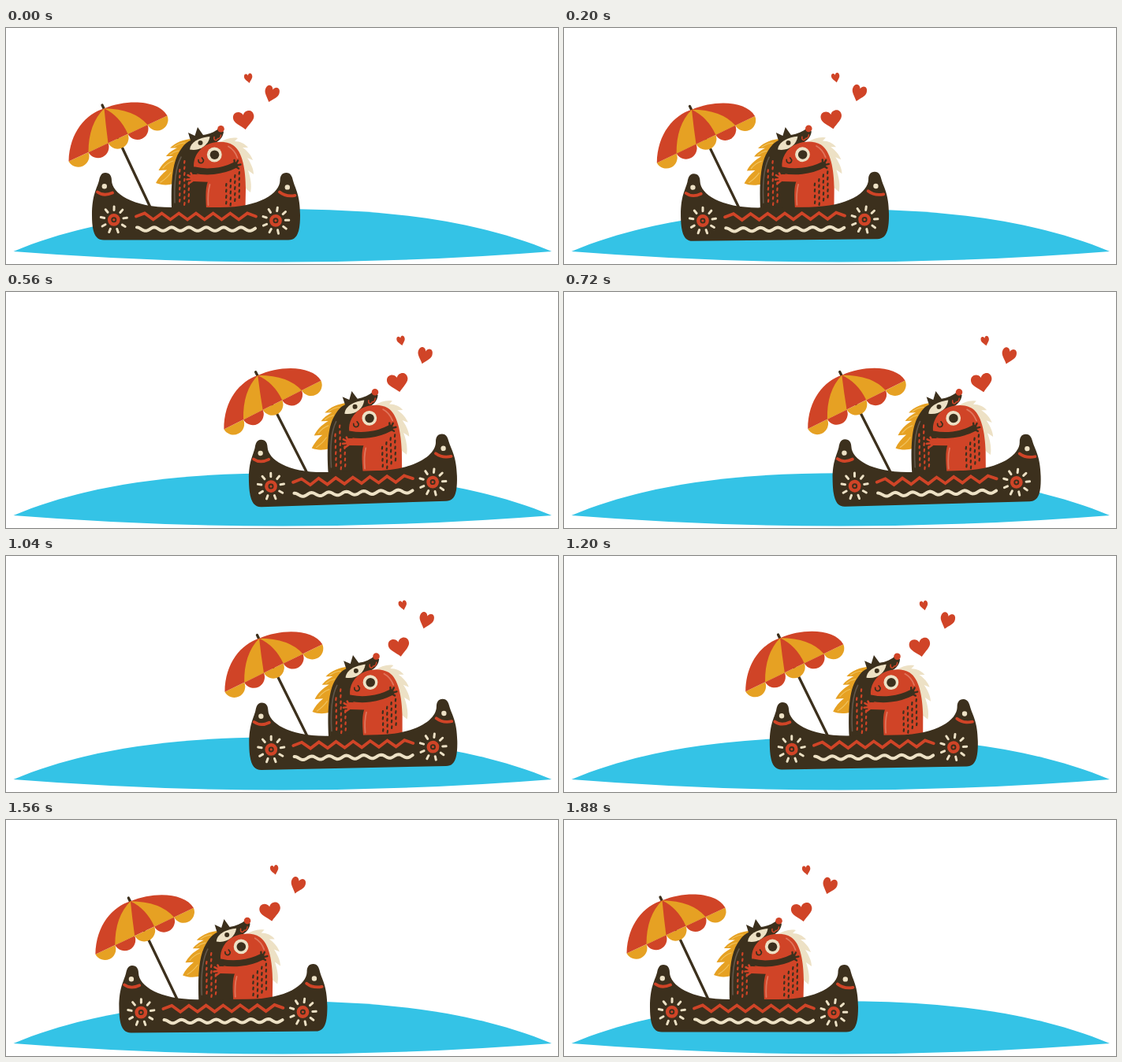
An HTML page that plays this animation: 700x300 px, repeating every 1.92 s.

```html
<!DOCTYPE html>
<html lang="en">
<head>
<meta charset="utf-8">
<title>Canoe for two</title>
<style>
  html, body { margin: 0; width: 100%; height: 100%; overflow: hidden; background: #fff; }
  svg { display: block; width: 700px; height: 300px; }
  .dark { fill: #3c301d; }
  .red { fill: #d04427; }
  .gold { fill: #e6a123; }
  .cream { fill: #ede1c5; }
  .line { fill: none; stroke-linecap: round; }
  .sDark { stroke: #3c301d; }
  .sRed { stroke: #d04427; }
  .sCream { stroke: #ede1c5; }
</style>
</head>
<body>
<svg viewBox="0 0 700 300">
  <path fill="#34c3e6" d="M9.5 284C110 241.5 230 230.3 350 230.3S591 241.5 692 284Q350 311 9.5 284Z"/>
  <g id="boat">
    <g id="hearts" class="red"></g>

    <path class="line sDark" stroke-width="3.3" d="M122 98L183.5 229"/>
    <g id="umbrella"></g>

    <!-- wolf -->
    <path class="gold" d="M236 141C226 141 214 146 208 152.5L217 152.5C210 156 206 159 203 163L212 163C203 168 197 174 193.5 181L204 180.5C198 185 193 191 190 197C197 200 206 200 212 198L226 158Z"/>
    <path class="line" stroke="#f0c25c" stroke-width="1.2" d="M213 151Q220 146 227 146M208 161Q213 157 219 156M199 178Q205 171 212 169M196 196Q204 191 209 184"/>
    <path class="dark" d="M210 230C209 196 211 171 220 157C225 149 229 145 234 143L231 133L239.5 137L243 126L250 136C258 135 265 132 271 127L276 132C275 140 270 144 262 148L256 230Z"/>
    <path class="line" stroke="#62574a" stroke-width="1.6" d="M214 222C213 197 215 177 222 164"/>
    <path class="cream" d="M233 154.5C234 144 247 139 258.5 138C257 149 246 157 233 154.5Z"/>
    <circle class="dark" cx="246.5" cy="146" r="3"/>
    <circle class="red" cx="272.5" cy="128.2" r="4.3"/>
    <path class="line sRed" stroke-width="1.5" d="M264 138.5C263 143 267 144 268.5 140.5M268.5 140.5C271 141 272.5 138.5 272.5 136"/>
    <path id="wolfSpots" class="line sRed" stroke-width="2.2"/>

    <!-- friend -->
    <path class="cream" d="M270 146C278 141 286 138.5 294 140L290 144C297 144 303 147 307 152L300 152C306 156 311 162 313 168L306 165C310 171 314 179 314 186L307 181C310 190 312 200 310 209L303 203L290 170Z"/>
    <path class="red" d="M254 230C253 212 253 203 256 195L240 184C236 175 238 162 248 153C258 144 277 142 288 149C300 157 304 180 304 205L303.5 230Z"/>
    <path class="line" stroke="#e0765c" stroke-width="1.8" d="M282 150.5Q290 155 293.5 165M256.5 225Q255.5 210 258.5 199"/>
    <circle class="cream" cx="264.3" cy="161" r="9.4"/>
    <circle class="dark" cx="264.5" cy="161.2" r="5.8"/>
    <path class="line sDark" stroke-width="1.7" d="M244 167.5C243.5 173 250 173 250.5 168M250.5 168L248.5 165"/>
    <path id="friendSpots" class="line sDark" stroke-width="2.2"/>

    <!-- arms -->
    <path class="line sRed" stroke-width="9" d="M256 191.2L238 190.5"/>
    <path class="line sRed" stroke-width="2.6" d="M237 190L234.5 184.5M236 190L230.5 187M236 192L229.5 192.5M237 194L232 197.5"/>
    <path class="line sDark" stroke-width="8" d="M239 180.5C253 184 273 183 290 174.5"/>
    <path class="line sDark" stroke-width="2.4" d="M290 174L289.5 168M291 174L294 168.5M291 175L297.5 173.5M291 176L295 178.5"/>

    <!-- canoe -->
    <path class="dark" d="M126 184C120.5 184 119 189 118 194C115 205 109 212 109 238C109 262 114 269.5 124 269.5H358C368 269.5 373 262 373 238C373 212 367 205 364 194C363 189 361 184 355.5 184C350 184 347.5 188 347.5 194C347 210 322 228 272 228H210C160 228 134.5 210 134 194C134 188 131.5 184 126 184Z"/>
    <circle class="cream" cx="124.8" cy="201.3" r="3.2"/>
    <circle class="cream" cx="356.8" cy="202.4" r="3.2"/>
    <path class="line sRed" stroke-width="3.8" d="M116 208.5Q124 214.5 135 209.5M347 208.5Q355 215 366.5 212.8"/>
    <path id="zigzag" class="line sRed" stroke-width="3.8"/>
    <path id="wave" class="line sCream" stroke-width="4"/>
    <g id="suns"></g>
  </g>
</svg>
<script>
const LOOP = 1920, STEP = 40, REACH = 232;
const $ = id => document.getElementById(id);
const range = n => [...Array(n).keys()];
const polyline = pts => 'M' + pts.map(p => p.map(v => v.toFixed(2)).join(' ')).join('L');

function add(parent, tag, attrs) {
  const el = document.createElementNS('http://www.w3.org/2000/svg', tag);
  for (const k in attrs) el.setAttribute(k, attrs[k]);
  parent.appendChild(el);
}

// x, y, half width, half height, tilt
const heart = 'M0-.5C-.2-1.02-1-1-1-.3C-1 .15-.45 .45 0 .95C.45 .45 1 .15 1-.3C1-1 .2-1.02 0-.5Z';
[[301.8, 117, 13.3, 12.8, -9], [336.6, 83.8, 9.2, 11.4, 18], [307.5, 63.8, 5.2, 6.7, -11]]
  .forEach(([x, y, w, h, a]) =>
    add($('hearts'), 'path', { d: heart, transform: `translate(${x} ${y}) rotate(${a}) scale(${w} ${h})` }));

function drawUmbrella() {
  const g = $('umbrella');
  const rim = range(6).map(i => [79.5 + 25 * i, 169.5 - 11.6 * i]);
  const ribs = [[104.5, 122], [126.5, 124], [144.5, 112], [162.5, 103]];
  range(5).forEach(i => add(g, 'path', {
    class: i % 2 ? 'red' : 'gold',
    d: `M${rim[i]}A13.8 13.8 0 0 0 ${rim[i + 1]}Z`
  }));
  add(g, 'path', { class: 'red', d: `M${rim[0]}C80.5 132 102 109 124.5 102.3C155.5 89.5 194 92.5 ${rim[5]}Z` });
  [0, 2].forEach(i => add(g, 'path', {
    class: 'gold',
    d: `M124.5 102.3Q${ribs[i]} ${rim[i + 1]}L${rim[i + 2]}Q${ribs[i + 1]} 124.5 102.3Z`
  }));
}

// columns: x, first y, number of dashes
function dashes(id, columns) {
  $(id).setAttribute('d', columns.map(([x, y, n]) =>
    range(n).map(i => `M${x} ${y + 7.6 * i}l-.4 2.6`).join('')).join(''));
}

function drawSun(cx, cy, turn) {
  const g = $('suns');
  add(g, 'circle', { cx, cy, r: 5.7, class: 'line sRed', 'stroke-width': 4.4 });
  add(g, 'circle', { cx, cy, r: 1.6, class: 'red' });
  range(9).forEach(i => {
    const a = (turn + 40 * i) * Math.PI / 180;
    const at = r => [cx + r * Math.cos(a), cy + r * Math.sin(a)];
    add(g, 'path', { class: 'line sCream', 'stroke-width': 3, d: polyline([at(12.3), at(16.8)]) });
  });
}

drawUmbrella();
dashes('wolfSpots', [[220.5, 180, 6], [226.5, 169, 8], [232, 196, 4]]);
dashes('friendSpots', [[279.5, 198, 4], [285, 192.5, 5], [290.5, 187, 5], [296, 183, 5]]);
$('zigzag').setAttribute('d', polyline(range(15).map(i =>
  [165 + 10.85 * i, i % 14 === 0 ? 239.5 : i % 2 ? 235.5 : 243.5])));
$('wave').setAttribute('d', polyline(range(76).map(i =>
  [166 + 2 * i, 255.6 - 2.2 * Math.cos(i * Math.PI / 5.5)])));
drawSun(136.8, 243.8, -9);
drawSun(342, 244.8, -2);

const clamp = v => Math.min(1, Math.max(0, v));
const swing = (t, from, to) => (1 - Math.cos(Math.PI * clamp((t - from) / (to - from)))) / 2;

function pose(t) {
  const x = REACH * (swing(t, 0, 744) - swing(t, 786, 1820));
  const tilt = -1.8 * (swing(t, 0, 480) - clamp((t - 600) / 1280));
  $('boat').setAttribute('transform', `translate(${x.toFixed(2)} 0) rotate(${tilt.toFixed(3)} 241 230)`);
}

function tick() {
  const t = performance.now() % LOOP;
  pose(Math.floor(t / STEP) * STEP);
  requestAnimationFrame(tick);
}
tick();
</script>
</body>
</html>
```
